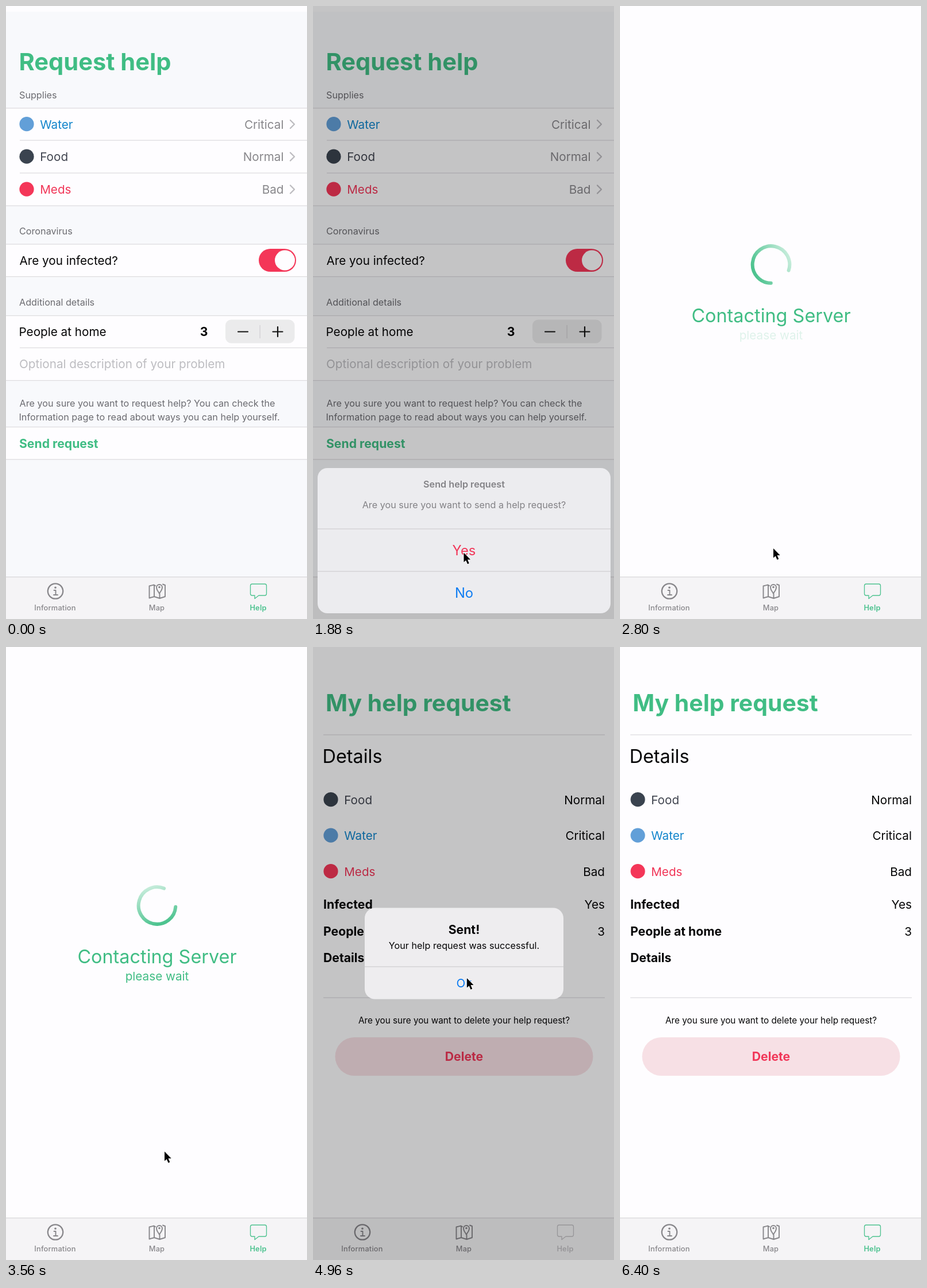
Recreate the animation shown at these times as an HTML page. Size 524 by 1068 pixels, loop 6440 ms.

```html
<!DOCTYPE html>
<html lang="en">
<head>
<meta charset="utf-8">
<title>Request help</title>
<style>
  html, body { margin: 0; width: 100%; height: 100%; overflow: hidden; background: #fefdff; }
  svg { display: block; width: 100vw; height: 100vh; }
  text { font-family: Inter, Roboto, sans-serif; font-size: 20.7px; font-optical-sizing: none; }
  .title { font-size: 41.6px; font-weight: 700; }
  .title.long { font-size: 40.9px; }
  .bold { font-size: 21.2px; font-weight: 700; }
  .note { font-size: 16.2px; }
  .small { font-size: 15.3px; }
  .big { font-size: 32.4px; }
  .choice { font-size: 23.8px; }
  .tab { font-size: 12.8px; font-weight: 500; letter-spacing: .2px; }
  .strong { font-weight: 600; }
  .line { fill: none; stroke-linecap: round; stroke-linejoin: round; }
</style>
</head>
<body>
<svg id="stage" viewBox="0 0 524 1068" preserveAspectRatio="none"></svg>
<script>
const LOOP = 6440;
const WHITE = '#fefdff', GREEN = '#40bd84', RED = '#f13759', BLUE = '#0d7cf2';
const GRAY = '#88878b', NOTE = '#6b6b70', RULE = '#dcdbde', BOX_RULE = '#cfced1';
const SUPPLIES = { // dot, label
  Water: ['#629fd8', '#1285cb'],
  Food: ['#3a434f', '#414550'],
  Meds: ['#f43658', RED],
};

const text = (x, y, str, fill = '#050506', cls = '', anchor = 'start') =>
  `<text x="${x}" y="${y}" class="${cls}" fill="${fill}" text-anchor="${anchor}">${str}</text>`;
const middle = (y, str, fill, cls, x = 263) => text(x, y, str, fill, cls, 'middle');
const rect = (x, y, w, h, fill, r = 0) =>
  `<rect x="${x}" y="${y}" width="${w}" height="${h}" rx="${r}" fill="${fill}"/>`;
const rule = (x, y, w, color = RULE) => rect(x, y - .6, w, 1.2, color);
const stroke = (d, color, width) =>
  `<path class="line" d="${d}" stroke="${color}" stroke-width="${width}"/>`;
const dot = (x, y, r, fill) => `<circle cx="${x}" cy="${y}" r="${r}" fill="${fill}"/>`;
const group = (id, ...parts) => `<g id="${id}">${parts.join('')}</g>`;

const supply = (name, x, y) =>
  dot(x + 12.3, y - .3, 12.6, SUPPLIES[name][0]) + text(x + 35.5, y + 7.7, name, SUPPLIES[name][1]);
const panel = (top, bottom) =>
  rect(0, top, 524, bottom - top, WHITE) + rule(0, top, 524) + rule(0, bottom, 524);
const formRow = (name, level, y) =>
  supply(name, 23.7, y) + text(483.5, y + 7.7, level, GRAY, '', 'end') +
  stroke(`M495 ${y - 7}l7 7l-7 7`, '#bdbcc0', 2.3);
const detailRow = (name, level, y) =>
  supply(name, 18.7, y) + text(508, y + 7.9, level, undefined, '', 'end');
const factRow = (name, value, y) =>
  text(18, y, name, undefined, 'bold') + text(508, y, value, undefined, '', 'end');

const form = group('form',
  rect(0, 10, 524, 1058, '#f8f9fc'),
  text(22.5, 112, 'Request help', GREEN, 'title'),
  text(23, 160.5, 'Supplies', NOTE, 'note'),
  panel(178, 348), rule(24, 234, 500), rule(24, 291, 500),
  formRow('Water', 'Critical', 206), formRow('Food', 'Normal', 262.5), formRow('Meds', 'Bad', 319.5),
  text(23, 398, 'Coronavirus', NOTE, 'note'),
  panel(415, 471.5),
  text(23.5, 451, 'Are you infected?'),
  rect(440, 423, 65, 40, '#f43658', 20), dot(485.5, 443, 17.5, WHITE),
  text(23, 522, 'Additional details', NOTE, 'note'),
  panel(539.5, 652.5), rule(24, 595.5, 500),
  text(22.5, 575, 'People at home'), middle(575, '3', undefined, 'bold', 344.5),
  rect(382, 546.5, 120.5, 41, '#ebebec', 10), rect(441.5, 556, 1.2, 23, BOX_RULE),
  stroke('M404 567.5h17M464.5 567.5h17M473 559v17', '#111', 2.2),
  text(23, 630.5, 'Optional description of your problem', '#bdbdc1'),
  text(23.5, 698, 'Are you sure you want to request help? You can check the', NOTE, 'note'),
  text(22.5, 721.5, 'Information page to read about ways you can help yourself.', NOTE, 'note'),
  panel(733.5, 790),
  text(23, 769.5, 'Send request', GREEN, 'bold'));

const server = group('server',
  `<defs><linearGradient id="fade" gradientUnits="userSpaceOnUse" x1="-28" y1="16" x2="34" y2="-10">
    <stop stop-color="#4dc38f"/><stop offset="1" stop-color="#c6ecdb"/></linearGradient></defs>`,
  `<g id="spinner">${stroke('M0 32.3A32.3 32.3 0 1 1 30.7 10', 'url(#fade)', 6)}</g>`,
  middle(551, 'Contacting Server', GREEN, 'big'),
  `<g id="wait">${middle(580.5, 'please wait', GREEN)}</g>`);

const details = group('details',
  text(22, 112, 'My help request', GREEN, 'title long'),
  rule(18, 153, 490), text(16.5, 201.5, 'Details', undefined, 'big'),
  detailRow('Food', 'Normal', 266), detailRow('Water', 'Critical', 328.5), detailRow('Meds', 'Bad', 391),
  factRow('Infected', 'Yes', 456), factRow('People at home', '3', 502.5), factRow('Details', '', 549),
  rule(18, 611, 490),
  middle(655.5, 'Are you sure you want to delete your help request?', undefined, 'small'),
  rect(38.5, 680, 449, 67, '#f7e0e5', 33.5), middle(721, 'Delete', RED, 'bold'));

const tabs = group('tabs',
  rect(0, 995, 524, 73, '#f5f4f6'), rule(0, 994.8, 524, '#d6d5d8'),
  `<circle class="line" cx="86" cy="1019.5" r="13.2" stroke="${GRAY}" stroke-width="2.3"/>`,
  dot(86, 1013.2, 1.8, GRAY), stroke('M83.5 1018h3v8M83 1026h7', GRAY, 1.9),
  middle(1053, 'Information', GRAY, 'tab', 85.5),
  stroke('M260 1010l-2.5-1.5l-8 2v21l8.5-2.5l9.5 3l9.5-3v-20l-4-1.5M258 1009v20M267.5 1024v8' +
    'M267 1024c-1.5-4-5-6-5-11a5 5 0 0 1 10 0c0 5-3.5 7-5 11z', GRAY, 1.9),
  dot(267, 1012.5, 1.8, GRAY),
  middle(1053, 'Map', GRAY, 'tab', 262.5),
  group('help',
    stroke('M428.5 1007h22q3 0 3 3v14q0 3-3 3h-10.5l-7 5.5v-5.5h-4.5q-3 0-3-3v-14q0-3 3-3z', 'currentColor', 1.3),
    middle(1053, 'Help', 'currentColor', 'tab strong', 439)));

const sheet = group('sheet',
  rect(8, 805, 510, 253, '', 17),
  middle(839, 'Send help request', '#838286', 'note strong'),
  middle(875, 'Are you sure you want to send a help request?', '#838286', 'note'),
  rule(8, 911, 510, BOX_RULE), middle(957, 'Yes', RED, 'choice'),
  rule(8, 985, 510, BOX_RULE), middle(1031, 'No', BLUE, 'choice'));

const alertBox = group('alert',
  rect(90, 454.5, 346, 159, '#eeedef', 18),
  middle(500.5, 'Sent!', undefined, 'bold'),
  middle(526, 'Your help request was successful.', undefined, 'note'),
  rule(90, 557, 346, BOX_RULE), middle(593.5, 'Ok', BLUE));

const cursor = group('cursor',
  '<path d="M0 0v16.5l3.7-3.3l2.8 6.6l2.8-1.2l-2.8-6.5h5.2z" stroke="#fff" stroke-width="1.6" stroke-linejoin="round" paint-order="stroke"/>');

const stage = document.getElementById('stage');
stage.innerHTML = rect(0, 0, 524, 1068, WHITE) + form + server + details + tabs +
  '<rect id="dim" width="524" height="1068"/>' + sheet + alertBox + cursor;
const el = Object.fromEntries([...stage.querySelectorAll('[id]')].map(node => [node.id, node]));

const SHEET_IN = 1040, SLIDE_IN = 1051, SHEET_OUT = 2090;
const SERVER = 2540, DETAILS = 3720, ALERT_IN = 3760, ALERT_OUT = 5120;
const CURSOR_PATH = [ // time, x, y
  [700, 540, 850], [1000, 98, 769], [1260, 98, 769], [1720, 262.5, 952.5], [2300, 262.5, 952.5],
  [2800, 267, 945], [3400, 276, 879], [4200, 276, 879], [4850, 268, 577], [5340, 268, 577], [5720, 540, 612],
];

const smooth = x => x * x * (3 - 2 * x);
const spring = ms => { // critically damped, 0 to 1
  const k = Math.max(0, ms) * .0143;
  return 1 - (1 + k) * Math.exp(-k);
};
const show = (node, visible) => { node.style.display = visible ? '' : 'none'; };

function moveCursor(t) {
  const i = CURSOR_PATH.findIndex(p => p[0] > t);
  show(el.cursor, i > 0);
  if (i < 1) return;
  const [t0, x0, y0] = CURSOR_PATH[i - 1], [t1, x1, y1] = CURSOR_PATH[i];
  const k = smooth((t - t0) / (t1 - t0));
  el.cursor.setAttribute('transform', `translate(${x0 + (x1 - x0) * k} ${y0 + (y1 - y0) * k})`);
}

function draw(t) {
  show(el.form, t < SERVER);
  show(el.server, t >= SERVER && t < DETAILS);
  show(el.details, t >= DETAILS);

  const sheetDim = t < SERVER ? spring(t - SHEET_IN) - spring(t - SHEET_OUT) : 0;
  const sheetUp = t < SERVER ? spring(t - SLIDE_IN) - spring(t - SHEET_OUT) : 0;
  const alertUp = spring(t - ALERT_IN) - spring(t - ALERT_OUT);
  el.dim.setAttribute('opacity', .227 * Math.max(sheetDim, alertUp));

  show(el.sheet, sheetUp > 0);
  el.sheet.setAttribute('transform', `translate(0 ${263 * (1 - sheetUp)})`);
  el.sheet.firstElementChild.setAttribute('fill', `hsl(240, 9%, ${95.5 - 2.4 * sheetUp}%)`);

  const scale = t < ALERT_OUT ? 1 + .21 * (1 - alertUp) : 1;
  show(el.alert, alertUp > .002);
  el.alert.setAttribute('opacity', alertUp);
  el.alert.setAttribute('transform', `translate(263 534) scale(${scale}) translate(-263 -534)`);

  const modal = (t > SHEET_IN && t < SHEET_OUT) || (t > ALERT_IN && t < ALERT_OUT);
  el.help.style.color = modal ? '#c2c1c4' : '#4cc28f';

  const waited = t - SERVER;
  el.spinner.setAttribute('transform', `translate(263 450.5) rotate(${(waited - 260) * .36})`);
  el.wait.setAttribute('opacity', (1 - Math.cos(Math.PI * waited / 1000)) / 2);

  moveCursor(t);
}

function frame() {
  draw(performance.now() % LOOP);
  requestAnimationFrame(frame);
}
frame();
</script>
</body>
</html>
```
